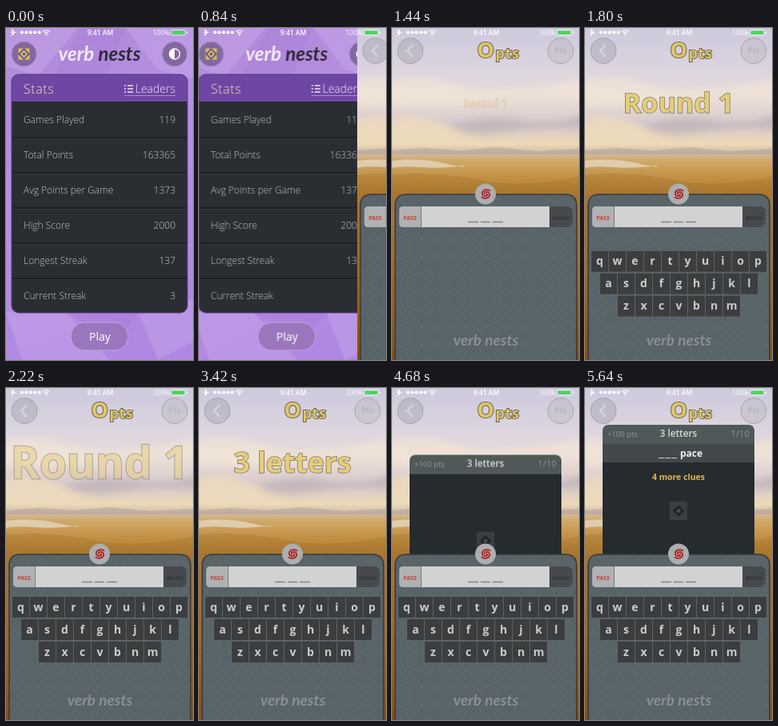
These frames come from a looping animation (234 px wide and 415 px high, 5940 ms). An HTML page:

```html
<!DOCTYPE html>
<html lang="en">
<head>
<meta charset="utf-8">
<title>Word game</title>
<style>
  html, body { margin: 0; width: 100%; height: 100%; overflow: hidden; background: #b28ae2; }
  svg { display: block; width: 100vw; height: 100vh; font-family: "Open Sans", "Noto Sans", sans-serif; }
  .mid { text-anchor: middle; }
  .end { text-anchor: end; }
  .light { font-weight: 300; }
  .bold { font-weight: 700; }
  .brand { font: italic 700 24px Lato, sans-serif; }
  .gold { fill: #e6cd78; stroke: #77756c; paint-order: stroke; font-weight: 700; }
  .stats, .game, .keys, .burst, .card, .clue { animation: 5.94s infinite both; }

  .stats { animation-name: leave; }
  .game { animation-name: enter; }
  .keys { animation-name: keys; }
  .burst { animation-name: burst; transform-origin: 117px 94px; font-size: 34.3px; stroke-width: 1.5px; }
  .second { animation-delay: 1.39s; }
  .card { animation-name: rise; }
  .clue { animation-name: reveal; }

  @keyframes leave {
    0%, 12.8% { transform: none; animation-timing-function: ease; }
    22.9%, 100% { transform: translateX(-47px); }
  }
  @keyframes enter {
    0%, 12.8% { transform: translateX(234px); animation-timing-function: ease; }
    22.9%, 100% { transform: none; }
  }
  @keyframes keys {
    0%, 25.25% { transform: translateY(156px); animation-timing-function: ease; }
    33.67%, 100% { transform: none; }
  }
  @keyframes burst {
    0%, 22.73% { opacity: 0; transform: scale(.1); animation-timing-function: ease-out; }
    29.8% { opacity: 1; transform: scale(.99); animation-timing-function: linear; }
    34.4% { opacity: 1; transform: scale(1.04); animation-timing-function: linear; }
    37.37% { opacity: .48; transform: scale(1.595); animation-timing-function: linear; }
    42%, 100% { opacity: 0; transform: scale(2.5); }
  }
  @keyframes rise {
    0%, 71.7% { transform: translateY(165px); visibility: hidden; animation-timing-function: ease-out; }
    71.72% { transform: translateY(165px); visibility: visible; animation-timing-function: ease-out; }
    83.8%, 100% { transform: none; visibility: visible; }
  }
  @keyframes reveal {
    0%, 88.4% { opacity: 0; transform: translateY(-8px); animation-timing-function: ease-out; }
    94.9%, 100% { opacity: 1; transform: none; }
  }
</style>
</head>
<body>
<svg viewBox="0 0 234 415" preserveAspectRatio="none">
  <defs>
    <linearGradient id="lilac" x2=".3" y2="1">
      <stop stop-color="#b08ad8"/><stop offset=".5" stop-color="#b78fe4"/><stop offset="1" stop-color="#b087e2"/>
    </linearGradient>
    <linearGradient id="land" x2="0" y2="1">
      <stop stop-color="#cdc9dc"/><stop offset=".12" stop-color="#dbd4e0"/>
      <stop offset=".22" stop-color="#eaddd6"/><stop offset=".29" stop-color="#d6c9cb"/>
      <stop offset=".35" stop-color="#ecd9b8"/><stop offset=".375" stop-color="#d3bda3"/>
      <stop offset=".4" stop-color="#cfa968"/><stop offset=".46" stop-color="#bf8c3f"/>
      <stop offset=".5" stop-color="#a97531"/><stop offset=".75" stop-color="#a8661c"/>
      <stop offset="1" stop-color="#8a5010"/>
    </linearGradient>
    <pattern id="weave" width="22" height="22" patternUnits="userSpaceOnUse">
      <path d="M11 0 22 11 11 22 0 11ZM11 5 17 11 11 17 5 11ZM0 0 22 22M22 0 0 22" fill="none" stroke="#465157" stroke-opacity=".35"/>
    </pattern>
    <filter id="soft" x="-20%" y="-60%" width="140%" height="220%"><feGaussianBlur stdDeviation="4"/></filter>
    <clipPath id="stage"><rect width="234" height="415"/></clipPath>
    <clipPath id="cardShape"><rect x="7" y="58" width="220" height="298" rx="9"/></clipPath>
    <clipPath id="clueShape"><path d="M22 215V54q0-8 8-8H204q8 0 8 8V215Z"/></clipPath>
    <clipPath id="barShape"><rect x="9" y="223" width="217" height="26" rx="5"/></clipPath>
  </defs>

  <g class="stats">
    <rect width="282" height="415" fill="url(#lilac)"/>
    <g fill="#d3b9f2" opacity=".3">
      <path d="M0 0H90L40 60 0 48ZM150 0H282V75L190 52Z"/>
      <path d="M0 355H75L130 415H20ZM165 352 234 340V392L190 415Z"/>
    </g>
    <path d="M95 0 150 0 125 58 60 58ZM75 356H165L140 392Z" fill="#9f75d3" opacity=".25"/>
    <g stroke="#a58ac4" fill="#83689f">
      <circle cx="22.5" cy="32.5" r="15.5"/><circle cx="211" cy="32.5" r="15.5"/>
    </g>
    <rect x="15.5" y="25.5" width="14" height="14" fill="#e2b65a"/>
    <path d="M22.5 25 30 32.5 22.5 40 15 32.5Z" fill="#56658c"/>
    <path d="M22.5 28 27 32.5 22.5 37 18 32.5Z" fill="#f0d184"/>
    <circle cx="22.5" cy="32.5" r="2" fill="#a0462f"/>
    <circle cx="211" cy="32.5" r="6.5" fill="none" stroke="#fff" stroke-width="1.3"/>
    <path d="M211 26a6.5 6.5 0 0 0 0 13Z" fill="#fff"/>
    <text class="brand mid" x="117" y="41" fill="#f3ebfa">verb <tspan fill="#2f2b38">nests</tspan></text>

    <g clip-path="url(#cardShape)">
      <rect x="7" y="58" width="220" height="298" fill="#2a2e32"/>
      <rect x="7" y="58" width="220" height="35" fill="#6e47a4"/>
      <g id="rows" class="light" font-size="12" fill="#c0c4c6"></g>
    </g>
    <rect x="7" y="58" width="220" height="298" rx="9" fill="none" stroke="#503777"/>
    <text class="light" x="22" y="82" font-size="16" letter-spacing=".6" fill="#f1e1ad">Stats</text>
    <text class="light end" x="212" y="81" font-size="14" fill="#f0e9f7">Leaders</text>
    <path d="M148 84.5H212" stroke="#c5afdf" stroke-width=".7"/>
    <path d="M152 72h7M152 76h7M152 80h7M148 72h2M148 76h2M148 80h2" stroke="#f0e9f7" stroke-width="1.5"/>
    <rect x="81" y="368" width="72" height="35" rx="17.5" fill="#9a77bd" stroke="#c4a8e2"/>
    <text class="mid" x="117.5" y="391" font-size="14" fill="#fff">Play</text>
  </g>

  <g class="game">
    <g clip-path="url(#stage)">
      <rect width="234" height="415" fill="url(#land)"/>
      <g filter="url(#soft)">
        <path d="M-10 70Q30 55 80 72T245 62V88Q160 80 100 92T-10 90Z" fill="#f3e6d6" opacity=".7"/>
        <path d="M70 124Q120 106 160 116T245 106V126Q180 122 140 130T70 128Z" fill="#b5a9b5" opacity=".55"/>
        <path d="M-10 116Q30 104 65 120T120 140H-10Z" fill="#f3dfbb" opacity=".7"/>
      </g>
      <path d="M0 153 40 150 85 153 130 149 180 154 234 151V158H0Z" fill="#b5a4a4" opacity=".6"/>
      <path d="M0 166Q35 162 65 169T90 172Q60 176 35 174T0 175Z" fill="#e3d4bd" opacity=".85"/>
      <path d="M0 183Q60 179 110 190T234 186V205H0Z" fill="#a1722c" opacity=".35"/>
    </g>

    <g stroke="#96969b" stroke-opacity=".7">
      <circle cx="23" cy="28.5" r="16" fill="#aaa8b4" fill-opacity=".5"/>
      <circle cx="211" cy="28.5" r="16" fill="#b5b2b9" fill-opacity=".35"/>
    </g>
    <path d="M26 21 19 28.5 26 36" fill="none" stroke="#d2cfd8" stroke-width="3"/>
    <text class="mid bold" x="211" y="32" font-size="10" fill="#9d9b9f" opacity=".35">Pts</text>
    <g class="gold" stroke-width="2" style="fill:#e2c766;stroke:#6c6756">
      <text x="106.5" y="37" font-size="27">O</text>
      <text x="129.5" y="37.5" font-size="18" letter-spacing=".6">pts</text>
    </g>

    <text class="burst gold mid" x="117" y="106">Round 1</text>
    <text class="burst second gold mid" x="117" y="106">3 letters</text>

    <g class="card">
      <g clip-path="url(#clueShape)">
        <rect x="22" y="46" width="190" height="170" fill="#262b2f"/>
        <rect x="22" y="46" width="190" height="24" fill="#505958"/>
        <text x="28" y="60.5" font-size="9.5" fill="#919a98">+100 pts</text>
        <text class="mid" x="117" y="60.5" font-size="11.7" font-weight="600" fill="#d9dcd6">3 letters</text>
        <text class="end" x="206" y="60.5" font-size="10" letter-spacing=".6" fill="#919a98">1/10</text>
        <g class="clue">
          <rect x="22" y="70" width="190" height="23" fill="#42484b"/>
          <path d="M92 87.5h7m1 0h7m1 0h7" stroke="#c9cccb"/>
          <text class="bold" x="119" y="86" font-size="12" fill="#f4f4f2">pace</text>
          <text class="mid bold" x="117" y="115" font-size="10.5" fill="#e2b44e">4 more clues</text>
        </g>
        <rect x="106" y="142" width="22" height="23" fill="#3b3e40"/>
        <path d="M117 146.5 124 153.5 117 160.5 110 153.5Z" fill="#1f2326"/>
        <circle cx="117" cy="153.5" r="2.5" fill="#484b4d"/>
      </g>
    </g>

    <path d="M4 420V222q0-14 14-14H217q14 0 14 14V420Z" fill="#5b666b"/>
    <path d="M4 420V222q0-14 14-14H217q14 0 14 14V420Z" fill="url(#weave)" stroke="#343a3d" stroke-width="1.5"/>
    <circle cx="117" cy="207.5" r="13" fill="#acaeb0"/>
    <path id="swirl" fill="none" stroke="#b01f20" stroke-width="1.8" stroke-linecap="round"/>
    <g clip-path="url(#barShape)">
      <rect x="9" y="223" width="217" height="26" fill="#d2d2d2"/>
      <rect x="9" y="223" width="27" height="26" fill="#b0b1b2"/>
      <path d="M36.5 223v26" stroke="#777c7f"/>
      <rect x="197" y="223" width="29" height="26" fill="#464a4d"/>
    </g>
    <text class="mid bold" x="22.5" y="239.5" font-size="7" fill="#c4423b">PASS</text>
    <text class="mid bold" x="211.5" y="239.5" font-size="7" fill="#303336">delete</text>
    <path d="M95 242.5h13m3 0h12m3 0h13" stroke="#828486" stroke-width="1.5"/>
    <text class="brand mid" x="117.5" y="397" style="font-size:19px" fill="#889094">verb nests</text>
    <g id="keyboard" class="keys mid bold" font-size="14"></g>
  </g>

  <g fill="#fff" font-size="8.5">
    <path d="M4 5.5 8 5 6.5 1.5H8L10.5 4.8 13 5.5 10.5 6.2 8 9.5H6.5L8 6 4 5.5Z"/>
    <g id="signal"></g>
    <path d="M46 4.5Q50.5 1 55 4.5M47.8 6.3Q50.5 4.2 53.2 6.3" fill="none" stroke="#fff" stroke-width="1.2"/>
    <circle cx="50.5" cy="8" r="1.2"/>
    <text class="mid" x="118" y="9" font-weight="600">9:41 AM</text>
    <text class="end" x="205" y="9">100%</text>
    <rect x="206.5" y="2.5" width="18" height="6.5" rx="1.5" fill="none" stroke="#fff" stroke-width=".7"/>
    <rect x="207.5" y="3.5" width="16" height="4.5" rx=".7" fill="#48d65c"/>
    <rect x="226" y="4.5" width="1.2" height="2.5" rx=".5"/>
  </g>
</svg>
<script>
  const fill = (id, html) => { document.getElementById(id).innerHTML = html; };

  const stats = [
    ["Games Played", 119], ["Total Points", 163365], ["Avg Points per Game", 1373],
    ["High Score", 2000], ["Longest Streak", 137], ["Current Streak", 3]
  ];
  fill("rows", stats.map(([label, value], i) => {
    const y = 93 + i * 44;
    return `<path d="M7 ${y}H227" stroke="#15181b" stroke-width="1.5"/>
      <path d="M7 ${y + 1.2}H227" stroke="#3a3f43" stroke-width=".6"/>
      <text x="22" y="${y + 26}">${label}</text>
      <text class="end" x="212" y="${y + 26}">${value}</text>`;
  }).join(""));

  const keyRows = [["qwertyuiop", 8, 261], ["asdfghjkl", 19, 289], ["zxcvbnm", 41, 317]];
  fill("keyboard", keyRows.map(([letters, left, y]) => [...letters].map((letter, i) => {
    const x = left + i * 22;
    return `<rect x="${x}" y="${y}" width="21" height="26" fill="#3b3d3f"/>
      <text x="${x + 10.5}" y="${y + 17.5}" fill="#cbcccd">${letter}</text>`;
  }).join("")).join(""));

  fill("signal", [0, 1, 2, 3, 4].map(i =>
    `<circle cx="${20 + i * 5.4}" cy="5.5" r="2.1"/>`).join(""));

  // Two interleaved arms that wind outwards.
  const spiralArm = turn => "M" + Array.from({ length: 24 }, (_, i) => {
    const angle = turn + i * 0.24, radius = 1.2 + i * 0.21;
    return `${(117.5 + radius * Math.cos(angle) * 1.15).toFixed(1)} ${(207.5 + radius * Math.sin(angle)).toFixed(1)}`;
  }).join("L");
  document.getElementById("swirl").setAttribute("d", spiralArm(0) + spiralArm(Math.PI));
</script>
</body>
</html>
```
